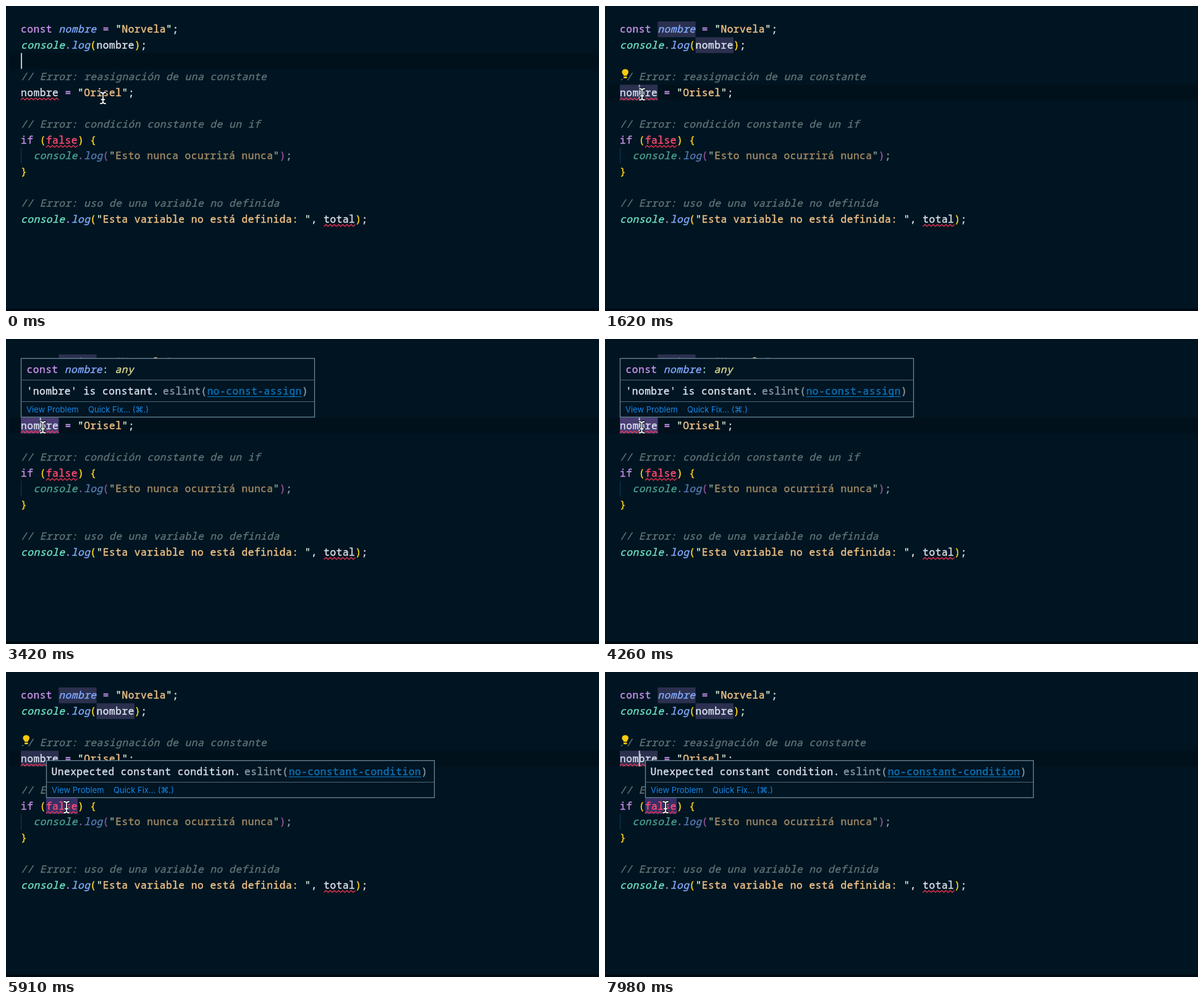
Recreate the animation shown at these times as an HTML page. Size 960 px wide and 494 px high, loop 8 s.

```html
<!DOCTYPE html>
<html lang="es">
<head>
<meta charset="utf-8">
<title>Editor</title>
<style>
  html, body { margin: 0; width: 100%; height: 100%; overflow: hidden; background: #001521; }
  svg { display: block; width: 100vw; height: 100vh; }
  text { white-space: pre; }
  .code { font: 500 16.2px "Noto Sans Mono", "DejaVu Sans Mono", monospace; letter-spacing: .5px; stroke-width: .4px; }
  .ui { font: 13px Inter, "Noto Sans", "DejaVu Sans", sans-serif; fill: #1687e6; }
  .it { font-style: italic; }
</style>
</head>
<body>
<svg id="stage" viewBox="0 0 960 494" preserveAspectRatio="none"></svg>
<script>
const LOOP = 8000, CH = 10.22, LH = 25.6, LEFT = 24, TOP = 25;
const COLORS = {
  key: "#c792ea", id: "#82aaff", op: "#c792ea", obj: "#6fe3c6", str: "#f2c487",
  quote: "#d9f5dd", text: "#dbe2ee", par: "#ffd619", par2: "#da70d6", bool: "#ff4a70",
  note: "#5f7276", type: "#dadd8c", colon: "#7fdbca", dim: "#8b9aa4", link: "#0c72b5"
};
const ITALIC = ["id", "obj", "note", "type"];

const stage = document.getElementById("stage");
const colX = col => LEFT + col * CH;
const lineY = row => TOP + row * LH;

function add(parent, tag, attrs, content) {
  const el = document.createElementNS("http://www.w3.org/2000/svg", tag);
  for (const key in attrs) el.setAttribute(key, attrs[key]);
  if (content) el.textContent = content;
  parent.appendChild(el);
  return el;
}

const rect = (parent, x, y, width, height, fill, more) =>
  add(parent, "rect", { x, y, width, height, fill, ...more });

// Tokens come as "style", "text" pairs; a thin stroke gives a medium weight.
function code(parent, x, y, ...tokens) {
  const line = add(parent, "text", { class: "code", x, y });
  for (let i = 0; i < tokens.length; i += 2) {
    const style = tokens[i], fill = COLORS[style];
    add(line, "tspan", { fill, stroke: fill, class: ITALIC.includes(style) ? "it" : "" }, tokens[i + 1]);
  }
  return line;
}

const row = (parent, n, col, ...tokens) => code(parent, colX(col), lineY(n) + 18.4, ...tokens);
const mark = (parent, n, col, len, fill) => rect(parent, colX(col), lineY(n), len * CH, LH, fill);
const logCall = ["obj", "console", "op", ".", "id", "log"];

function squiggle(n, col, len) {
  const x0 = colX(col), y = lineY(n) + 23.2, step = 3.4;
  let d = "";
  for (let i = 0; i * step <= len * CH; i++)
    d += (i ? "L" : "M") + (x0 + i * step) + " " + (y + (i % 2 ? -1.5 : 1.5));
  add(stage, "path", { d, fill: "none", stroke: "#ee3350", "stroke-width": 1.4 });
}

function panel(x, y, w, h, dividers) {
  const g = add(stage, "g", {});
  rect(g, x + .5, y + .5, w, h, "#011523", { stroke: "#6c8797", "stroke-width": 1.3 });
  for (const dy of dividers) rect(g, x, y + dy, w, 1, "#4d6a7c");
  const linkY = y + h - 7.5;
  add(g, "text", { class: "ui", x: x + 9, y: linkY }, "View Problem");
  add(g, "text", { class: "ui", x: x + 109, y: linkY }, "Quick Fix... (⌘.)");
  return g;
}

function problem(g, x, y, message, rule) {
  const ruleX = x + message.length * CH + 6 + 7 * CH, ruleW = rule.length * CH;
  code(g, x, y, "text", message);
  code(g, ruleX - 7 * CH, y, "dim", "eslint(");
  code(g, ruleX, y, "link", rule);
  rect(g, ruleX, y + 2.4, ruleW, 1.2, COLORS.link);
  code(g, ruleX + ruleW, y, "dim", ")");
}

// Background layers
rect(stage, 0, 0, 960, 494, "#001521");
rect(stage, 0, 490, 960, 4, "#000b14");
const activeLine = rect(stage, 5, 0, 955, LH, "#00111c");
const words = add(stage, "g", {});
mark(words, 0, 6, 6, "#2b304f");
mark(words, 1, 12, 6, "#2b304f");
mark(words, 4, 0, 6, "#2b304f");
const hoverName = mark(stage, 4, 0, 6, "#4a3e75");
const hoverFalse = mark(stage, 7, 4, 5, "#382f68");
rect(stage, LEFT, lineY(8), 1.2, LH, "#123450");

// Code
row(stage, 0, 0, "key", "const ", "id", "nombre", "op", " = ", "quote", '"', "str", "Norvela", "quote", '"', "text", ";");
row(stage, 1, 0, ...logCall, "par", "(", "text", "nombre", "par", ")", "text", ";");
row(stage, 3, 0, "note", "// Error: reasignación de una constante");
row(stage, 4, 0, "text", "nombre", "op", " = ", "quote", '"', "str", "Orisel", "quote", '"', "text", ";");
row(stage, 6, 0, "note", "// Error: condición constante de un if");
row(stage, 7, 0, "key", "if ", "par", "(", "bool", "false", "par", ") {");
row(stage, 8, 2, ...logCall, "par2", "(", "quote", '"', "str", "Esto nunca ocurrirá nunca", "quote", '"', "par2", ")", "text", ";")
  .setAttribute("opacity", .67);
row(stage, 9, 0, "par", "}");
row(stage, 11, 0, "note", "// Error: uso de una variable no definida");
row(stage, 12, 0, ...logCall, "par", "(", "quote", '"', "str", "Esta variable no está definida: ", "quote", '"', "text", ", total", "par", ")", "text", ";");
squiggle(4, 0, 6);
squiggle(7, 4, 5);
squiggle(12, 48, 5);

const bulb = add(stage, "g", {});
rect(bulb, 27, 102, 11, 16, "#001521");
add(bulb, "path", { d: "M30 113V111.5C25.8 108.5 27 102.3 32.8 102.3S39.6 108.5 35.6 111.5V113Z", fill: "#ffc90e" });
rect(bulb, 30, 114.2, 5.6, 2.8, "#ffc90e", { rx: 1 });

const caret = rect(stage, 0, 0, 2, LH, "#b9c8d4");

// Hover panels
const tipConst = panel(24, 31, 475, 95, [35, 70]);
code(tipConst, 33.5, 55, "key", "const ", "id", "nombre", "colon", ": ", "type", "any");
problem(tipConst, 33.5, 90.4, "'nombre' is constant.", "no-const-assign");
const tipCond = panel(65, 143, 628, 60, [35]);
problem(tipCond, 73.5, 166.8, "Unexpected constant condition.", "no-constant-condition");

const ring = add(stage, "circle", { r: 20, fill: "none", stroke: "#0a3260", "stroke-width": 3 });

const mouse = add(stage, "g", { fill: "none", "stroke-linecap": "round" });
const beam = "M-4-9Q0-9 0-6Q0-9 4-9M0-6V6M-4 9Q0 9 0 6Q0 9 4 9M-2.5 2.5H2.5";
add(mouse, "path", { d: beam, stroke: "#06121b", "stroke-width": 4 });
add(mouse, "path", { d: beam, stroke: "#f4f6f8", "stroke-width": 1.8 });

// Motion
const PATH = [
  [0, 157, 149], [470, 49.5, 144.5], [950, 49.5, 144.5], [1400, 60, 143],
  [4350, 59.5, 143], [5110, 98, 219], [LOOP, 98, 219]
];
const CLICK = 545, BLINK = 940;
const clamp = v => Math.max(0, Math.min(1, v));
const mix = (a, b, k) => a + (b - a) * k;
const ease = k => k * k * (3 - 2 * k);
const show = (el, on) => el.setAttribute("visibility", on ? "visible" : "hidden");

function mouseAt(t) {
  const i = PATH.findIndex(p => p[0] > t);
  const a = PATH[i - 1], b = PATH[i], k = ease((t - a[0]) / (b[0] - a[0]));
  return [mix(a[1], b[1], k), mix(a[2], b[2], k)];
}

// Soft blink: full around phase 0, gone around phase one half.
function blink(t) {
  const p = (t % BLINK) / BLINK;
  return clamp((.3 - Math.min(p, 1 - p)) / .2);
}

function draw(t) {
  const clicked = t >= CLICK;
  const [mx, my] = mouseAt(t);
  mouse.setAttribute("transform", `translate(${mx} ${my})`);

  activeLine.setAttribute("y", lineY(clicked ? 4 : 2));
  const k = clamp((t - CLICK) / 78);
  caret.setAttribute("x", mix(LEFT, colX(3), k));
  caret.setAttribute("y", mix(lineY(2), lineY(4), k));
  caret.setAttribute("opacity", blink(clicked ? t - CLICK : t));

  ring.setAttribute("cx", mx);
  ring.setAttribute("cy", my);
  ring.setAttribute("opacity", clicked ? clamp((780 - t) / 180) : 0);

  show(words, t >= 840);
  show(bulb, t >= 900);
  const first = t >= 2000 && t < 4530, second = t >= 5520;
  show(tipConst, first);
  show(hoverName, first);
  show(tipCond, second);
  show(hoverFalse, second);
}

const start = performance.now();
function tick() {
  draw((performance.now() - start) % LOOP);
  requestAnimationFrame(tick);
}
tick();
</script>
</body>
</html>
```
